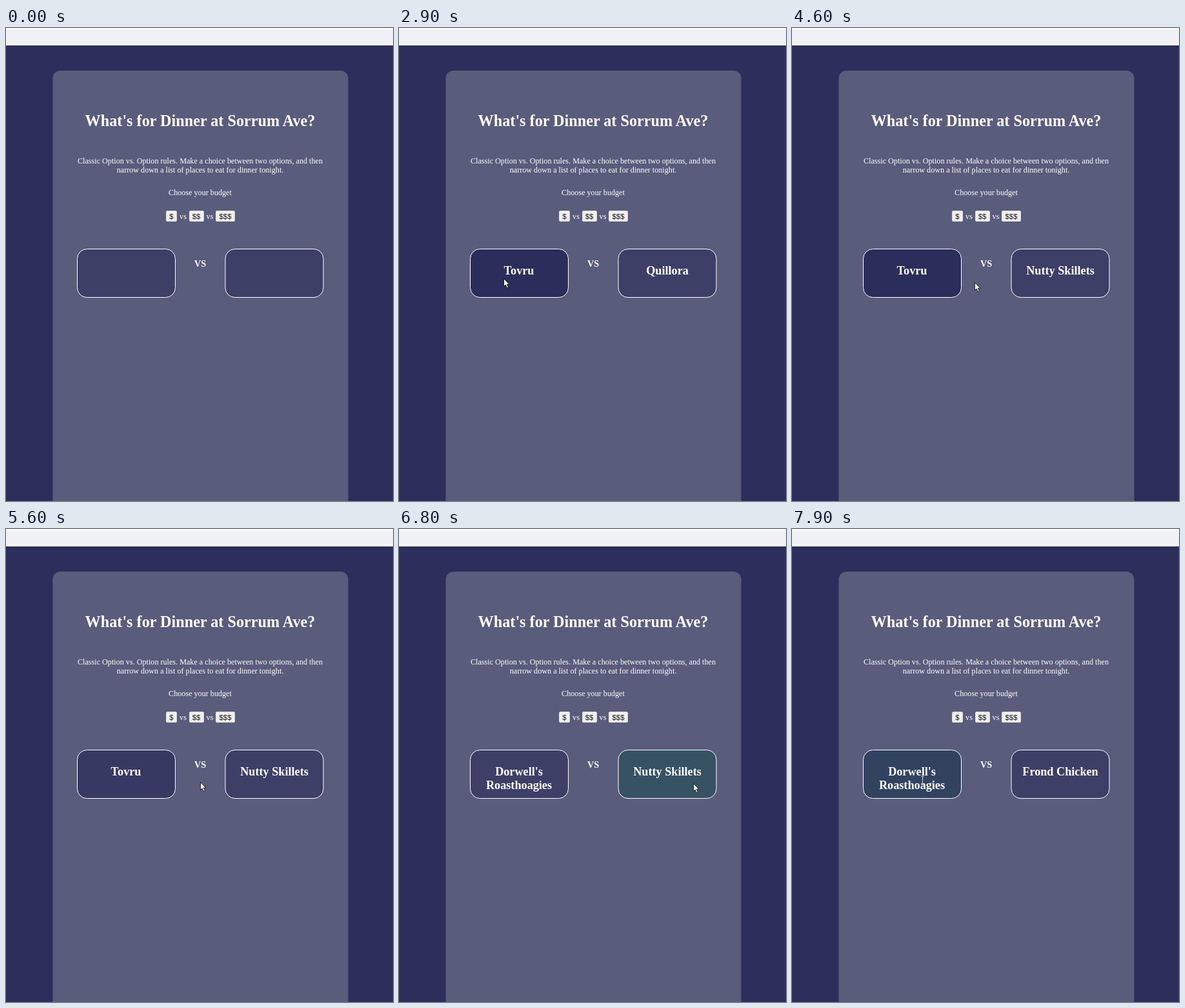
Write an HTML page that moves like this. It is 600x733 px and loops after 8000 ms.

```html
<!DOCTYPE html>
<html lang="en">
<head>
<meta charset="utf-8">
<title>Dinner picker</title>
<style>
  html, body { margin: 0; width: 100%; height: 100%; overflow: hidden; background: #2c2e5b; }
  svg { display: block; width: 600px; height: 733px; }
  text { font: 12.15px "Liberation Serif", "Times New Roman", serif; fill: #fff; text-anchor: middle; }
  .title { font-size: 24.2px; font-weight: bold; }
  .name { font-size: 18.2px; font-weight: bold; }
  .versus { font-size: 14.2px; font-weight: bold; }
  .money { font: 11.3px "Liberation Sans", Arial, sans-serif; fill: #111; }
  .button { fill: #efefef; stroke: #dcdcdf; }
  .card { stroke: #fff; }
</style>
</head>
<body>
<svg viewBox="0 0 600 733">
  <rect width="600" height="27" fill="#fff"/>
  <rect y="2" width="600" height="22" fill="#f0f1f4"/>
  <rect x="72.5" y="66" width="458" height="700" rx="12" fill="#5a5c7c"/>
  <text class="title" x="301" y="152">What's for Dinner at Sorrum Ave?</text>
  <text x="301" y="210">Classic Option vs. Option rules. Make a choice between two options, and then</text>
  <text x="301" y="224">narrow down a list of places to eat for dinner tonight.</text>
  <text x="301" y="259">Choose your budget</text>
  <rect class="button" x="248.5" y="283.5" width="16" height="16" rx="1.5"/>
  <rect class="button" x="284.5" y="283.5" width="22" height="16" rx="1.5"/>
  <rect class="button" x="325.5" y="283.5" width="29" height="16" rx="1.5"/>
  <text class="money" x="256.5" y="296">$</text>
  <text x="274.5" y="296">vs</text>
  <text class="money" x="295" y="296">$$</text>
  <text x="316" y="296">vs</text>
  <text class="money" x="340" y="296">$$$</text>
  <rect class="card" id="leftCard" x="110.5" y="342.5" width="152" height="75" rx="15"/>
  <rect class="card" id="rightCard" x="340" y="342.5" width="152" height="75" rx="15"/>
  <text class="name" id="leftName" x="186" y="382"></text>
  <text class="name" id="leftMore" x="186" y="403"></text>
  <text class="name" id="rightName" x="416" y="382"></text>
  <text class="versus" x="301" y="370">VS</text>
  <path id="arrow" d="M.5 .5V12.5L3.2 10 5.2 14.7 7.3 13.8 5.3 9.2H9Z" fill="#fff" stroke="#111" stroke-width=".9"/>
  <path id="beam" d="M-2 -6.5H2M0 -6.5V6.5M-2 6.5H2" fill="none" stroke="#c9cddb"/>
</svg>
<script>
const el = id => document.getElementById(id);
const LOOP = 8000, STEP = 100, FADE = 500;
const normal = [61, 63, 103], hovered = [43, 45, 91], picked = [69, 133, 109];

// Each key is [time, value, ...]
const cursorKeys = [
  [0, 334, 282], [300, 334, 282], [700, 522, 450], [1100, 290, 288], [1600, 290, 288],
  [2300, 235, 350], [2700, 162, 388], [4200, 162, 388], [4600, 283, 394],
  [5200, 283, 394], [5500, 245, 392], [5900, 470, 393], [6100, 494, 394],
  [6200, 491, 396], [6500, 456, 394], [7000, 456, 394], [7400, 202, 390]
];
const leftHover = [[2300, 0], [2700, 1], [4600, 1], [5000, 0], [5300, 0],
  [5500, .5], [5800, 0], [7200, 0], [7600, 1]];
const rightHover = [[5700, 0], [6000, 1], [7100, 1], [7500, 0]];
const leftClicks = [2950, 4000, 7525], rightClicks = [6065, 6510];
const leftNames = [[0, ""], [1600, "Tovru"], [6600, "Dorwell's"]];
const rightNames = [[0, ""], [1600, "Quillora"], [3100, "Lagoon Swizzle"],
  [4100, "Nutty Skillets"], [7600, "Frond Chicken"]];

const mix = (a, b, k) => a.map((v, i) => v + (b[i] - v) * k);
const latest = (keys, t) => keys.filter(k => k[0] <= t).pop();

function tween(keys, t) {
  const a = latest(keys, t) || keys[0];
  const b = keys[keys.indexOf(a) + 1];
  if (!b || t < a[0]) return a.slice(1);
  return mix(a, b, (t - a[0]) / (b[0] - a[0])).slice(1);
}

function paintCard(id, hover, clicks, t) {
  const glow = Math.max(...clicks.map(c => t < c ? 0 : Math.max(0, 1 - (t - c) / FADE)));
  const color = mix(mix(normal, hovered, tween(hover, t)[0]), picked, glow);
  el(id).setAttribute("fill", `rgb(${color.map(Math.round)})`);
}

function draw(now) {
  const t = Math.floor(now % LOOP / STEP) * STEP;
  paintCard("leftCard", leftHover, leftClicks, t);
  paintCard("rightCard", rightHover, rightClicks, t);
  el("leftName").textContent = latest(leftNames, t)[1];
  el("leftMore").textContent = t >= 6600 ? "Roasthoagies" : "";
  el("rightName").textContent = latest(rightNames, t)[1];

  const [x, y] = tween(cursorKeys, t).map(Math.round);
  const overText = t >= 7400;
  el("arrow").setAttribute("transform", `translate(${x} ${y})`);
  el("beam").setAttribute("transform", `translate(${x + .5} ${y})`);
  el("arrow").style.display = t < 100 || overText ? "none" : "";
  el("beam").style.display = overText ? "" : "none";
}

const start = performance.now();
function tick() {
  draw(performance.now() - start);
  requestAnimationFrame(tick);
}
tick();
</script>
</body>
</html>
```
